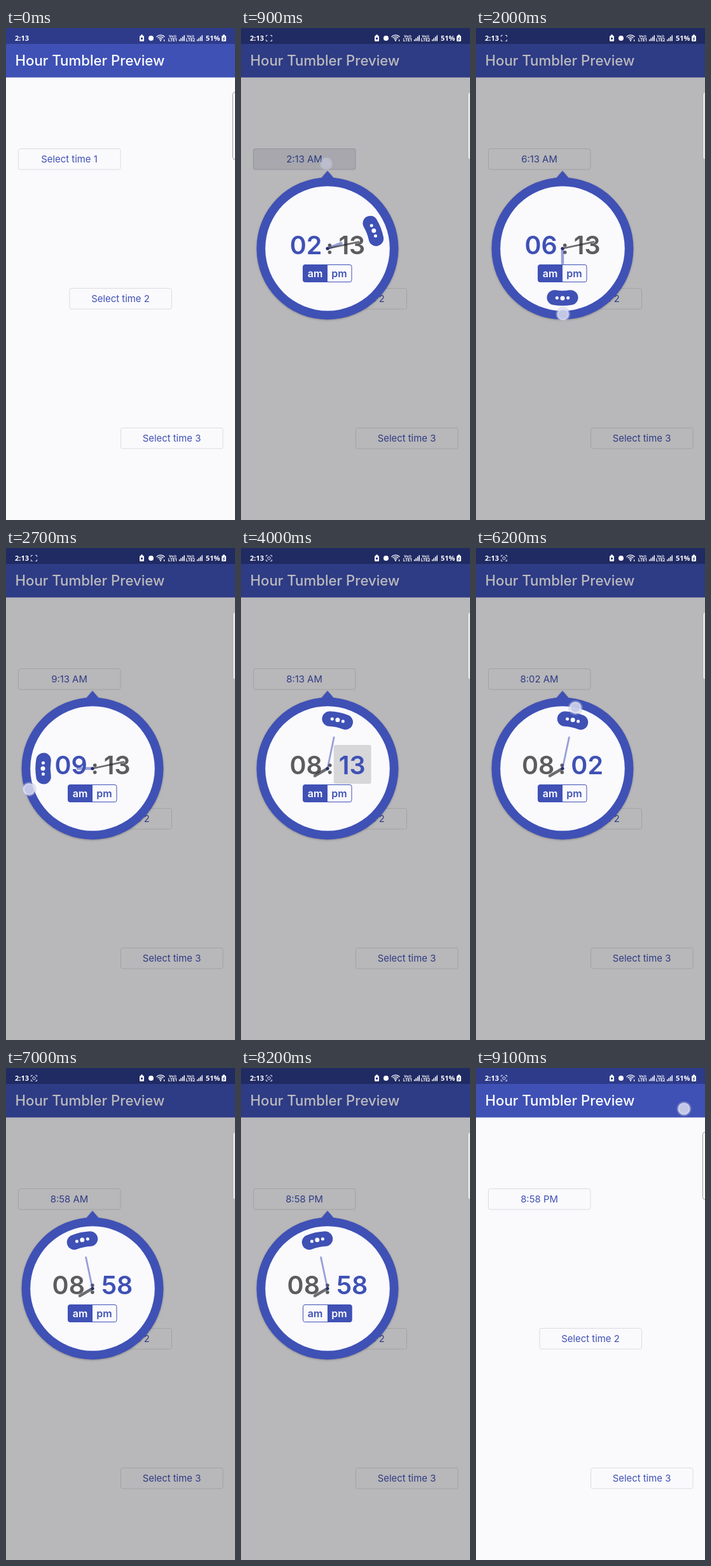
An HTML page with a canvas for the animation above (9200 ms loop, 360 by 772 pixels).

```html
<!DOCTYPE html>
<html lang="en">
<head>
<meta charset="utf-8">
<title>Time picker</title>
<style>
html, body { margin: 0; width: 100%; height: 100%; overflow: hidden; background: #faf9fc; }
canvas { display: block; width: 360px; height: 772px; }
</style>
</head>
<body>
<canvas></canvas>
<script>
const LOOP = 9200, W = 360, H = 772, CX = 136, CY = 346;
const BLUE = '#3f51b5', PAPER = '#faf9fc', GREY = '#5c5c5e';
const UI = 'Inter, sans-serif', SYSTEM = '"Noto Sans", sans-serif';
const canvas = document.querySelector('canvas');
const ctx = canvas.getContext('2d');
const ratio = window.devicePixelRatio || 1;
canvas.width = W * ratio;
canvas.height = H * ratio;

const clamp = v => Math.max(0, Math.min(1, v));
const smooth = u => u * u * (3 - 2 * u);
const ramp = (t, from, to) => smooth(clamp((t - from) / (to - from)));
const pulse = (t, from, to, fade = 80) => Math.min(ramp(t, from, from + 50), 1 - ramp(t, to - fade, to));

// Eased value from [time, value] keys
function track(keys, t) {
  let v = keys[0][1];
  for (let i = 1; i < keys.length; i++) {
    const [t0, v0] = keys[i - 1], [t1, v1] = keys[i];
    if (t >= t0) v = v0 + (v1 - v0) * ramp(t, t0, t1);
  }
  return v;
}

// Clock angles in degrees, clockwise from the top
const KNOB = [[1650, 69], [2350, 300], [2700, 270], [3050, 150], [3400, 240], [3750, 240],
  [4160, 438], [4600, 438], [6200, 732], [6450, 732], [6800, 708]];
const FINGER_LAG = [[1600, 0], [2700, -18], [3400, 0]];
const FINGER_RADIUS = [[1500, 78], [2100, 105], [4500, 105], [6200, 97.5]];

function polar(deg, r) {
  const a = deg * Math.PI / 180;
  return [CX + r * Math.sin(a), CY - r * Math.cos(a)];
}

function text(s, x, y, size, color, weight = 400, align = 'left', family = UI) {
  ctx.font = `${weight} ${size}px ${family}`;
  ctx.textAlign = align;
  ctx.fillStyle = color;
  ctx.fillText(s, x, y);
}

function rect(x, y, w, h, color) {
  ctx.fillStyle = color;
  ctx.fillRect(x, y, w, h);
}

function box(x, y, w, h, r, fill, stroke) {
  ctx.beginPath();
  ctx.roundRect(x, y, w, h, r);
  if (fill) { ctx.fillStyle = fill; ctx.fill(); }
  if (stroke) { ctx.strokeStyle = stroke; ctx.lineWidth = 1; ctx.stroke(); }
}

function disc(x, y, r, color) {
  ctx.beginPath();
  ctx.arc(x, y, r, 0, 7);
  ctx.fillStyle = color;
  ctx.fill();
}

function line(points, color, width) {
  ctx.beginPath();
  points.forEach(p => ctx.lineTo(...p));
  ctx.strokeStyle = color;
  ctx.lineWidth = width;
  ctx.stroke();
}

function button(x, y, label) {
  box(x + .5, y + .5, 160.5, 32.5, 3, PAPER, '#dcdde0');
  text(label, x + 80.5, y + 21.8, 14.9, BLUE, 400, 'center');
}

function signal(x, n) {
  text('Vo))', x, 15, 6, '#fff', 700, 'center', SYSTEM);
  text('LTE' + n, x, 21, 6.5, '#fff', 700, 'center', SYSTEM);
  for (let i = 0; i < 4; i++) rect(x + 10 + i * 2.5, 18 - i * 2.2, 1.5, 2.5 + i * 2.2, '#fff');
}

function battery(x) {
  box(x, 12, 7, 9, 1.5, '#fff');
  rect(x + 2, 10.5, 3, 2, '#fff');
}

function statusBar(t, dim) {
  const mix = (a, b) => Math.round(a + (b - a) * dim);
  rect(0, 0, W, 25, `rgb(${mix(46, 32)},${mix(59, 42)},${mix(139, 99)})`);
  text('2:13', 14, 20, 11, '#fff', 600, 'left', SYSTEM);
  if (t >= 500) {
    for (const sx of [-1, 1]) for (const sy of [-1, 1]) {
      line([[44 + sx * 4.5, 16 + sy * 2], [44 + sx * 4.5, 16 + sy * 4.5], [44 + sx * 2, 16 + sy * 4.5]], '#d5daf4', 1);
    }
    if (t >= 3600) box(42, 14, 4, 4, 1, null, '#d5daf4');
  }
  battery(210);
  rect(212, 15, 3, 3, '#303d8c');
  disc(228, 16, 4, '#fff');
  for (let i = 1; i < 4; i++) {
    ctx.beginPath();
    ctx.arc(243, 19.5, i * 2.8, -Math.PI * .78, -Math.PI * .22);
    ctx.strokeStyle = '#fff';
    ctx.lineWidth = 1.3;
    ctx.stroke();
  }
  disc(243, 19.5, 1.2, '#fff');
  rect(248, 18, 1.2, 3, '#fff');
  signal(262, 1);
  signal(290, 2);
  text('51%', 314, 20, 11, '#fff', 600, 'left', SYSTEM);
  battery(339);
  line([[344, 14], [341, 17], [344, 17], [341, 20]], '#303d8c', 1);
}

function knob(deg) {
  const a = (deg - 90) * Math.PI / 180;
  ctx.beginPath();
  ctx.arc(CX, CY, 78, a - .165, a + .165);
  ctx.strokeStyle = BLUE;
  ctx.lineWidth = 23.5;
  ctx.lineCap = 'round';
  ctx.stroke();
  for (const k of [-1, 0, 1]) disc(...polar(deg + k * 6.4, 78), k ? 2.5 : 3.5, '#fff');
}

function hand(deg, length, width, active) {
  line([[CX, CY], polar(deg, length)], active ? 'rgba(63,81,181,.53)' : 'rgba(35,35,40,.66)', width);
}

function digits(hour, minute, minuteMode, tap) {
  const pad = n => String(n).padStart(2, '0'), gap = 7, colon = 12;
  ctx.font = `600 39.5px ${UI}`;
  const hh = pad(hour), mm = pad(minute);
  const wh = ctx.measureText(hh).width + gap * 2;
  const wm = ctx.measureText(mm).width + gap * 2;
  const left = CX - (wh + colon + wm) / 2, right = left + wh + colon;
  if (tap > 0) box(right - 1, 309, wm + 3, 61, 3, `rgba(0,0,0,${.14 * tap})`);
  text(hh, left + gap, 355, 39.5, minuteMode ? GREY : BLUE, 600);
  text(mm, right + gap, 355, 39.5, minuteMode ? BLUE : GREY, 600);
  for (const y of [341, 352]) disc(left + wh + 5, y, 2.8, GREY);
}

function amPm(pm) {
  box(97.5, 371.5, 76.5, 27, 3, PAPER, BLUE);
  box(pm ? 136 : 97.5, 371.5, 38.5, 27, pm ? [0, 3, 3, 0] : [3, 0, 0, 3], BLUE);
  text('am', 116.5, 390.5, 16, pm ? BLUE : '#fff', 600, 'center');
  text('pm', 154.5, 390.5, 16, pm ? '#fff' : BLUE, 600, 'center');
}

function picker(t, state) {
  const { angle, hour, minute, minuteMode, pm } = state;
  ctx.save();
  ctx.shadowColor = 'rgba(0,0,0,.25)';
  ctx.shadowBlur = 3 * ratio;
  ctx.shadowOffsetY = ratio;
  ctx.beginPath();
  ctx.arc(CX, CY, 111.5, 0, 7);
  ctx.moveTo(CX, 224);
  ctx.lineTo(CX + 13, 239);
  ctx.lineTo(CX - 13, 239);
  ctx.fillStyle = BLUE;
  ctx.fill();
  ctx.restore();
  disc(CX, CY, 97.8, PAPER);
  knob(angle);
  digits(hour, minute, minuteMode, pulse(t, 3700, 4200, 120));
  amPm(pm);
  ctx.lineCap = 'round';
  hand(minuteMode ? hour * 30 : angle, 23, 4.5, !minuteMode);
  hand(minuteMode ? angle : minute * 6, 50, 2.8, minuteMode);
  ctx.lineCap = 'butt';
  disc(CX, CY, 2.6, '#26306e');
}

function finger(x, y, alpha) {
  if (alpha <= 0) return;
  ctx.globalAlpha = alpha;
  disc(x, y, 11.5, 'rgba(185,188,215,.4)');
  disc(x, y, 9.5, 'rgba(228,230,247,.8)');
  disc(x, y, 7, 'rgba(190,195,226,.7)');
  ctx.globalAlpha = 1;
}

function stateAt(t) {
  const raw = track(KNOB, t);
  const minuteMode = t >= 3700;
  const hour = minuteMode ? 8 : (Math.round(raw / 30) + 11) % 12 + 1;
  const minute = t < 4500 ? 13 : Math.round(raw / 6) % 60;
  const dragging = t > 1700 && !minuteMode;
  return { raw, minuteMode, hour, minute, angle: dragging ? Math.round(raw / 30) * 30 : raw, pm: t >= 7500 };
}

function draw(t) {
  const s = stateAt(t);
  const show = Math.min(ramp(t, 650, 870), 1 - ramp(t, 8210, 8500));
  ctx.setTransform(ratio, 0, 0, ratio, 0, 0);
  rect(0, 0, W, H, PAPER);
  rect(0, 25, W, 52.6, BLUE);
  text('Hour Tumbler Preview', 14.5, 58.5, 22.2, '#fff', 500);

  const clock = `${s.hour}:${String(s.minute).padStart(2, '0')} ${s.pm ? 'PM' : 'AM'}`;
  button(19, 189, t < 700 ? 'Select time 1' : clock);
  button(99.5, 408, 'Select time 2');
  button(180, 627, 'Select time 3');
  const press = pulse(t, 600, 1200, 250);
  if (press > 0) box(19, 189, 161.5, 33.5, 3, `rgba(40,50,110,${.11 * press})`);

  rect(0, 0, W, H, `rgba(0,0,0,${.265 * show})`);
  statusBar(t, show);
  box(356.5, 100.5, 10, 106, 4, 'rgba(255,255,255,.65)', show > .5 ? '#a9a8ab' : '#98989c');

  if (show > 0) {
    ctx.globalAlpha = show;
    picker(t, s);
    ctx.globalAlpha = 1;
  }

  finger(134, 213, pulse(t, 620, 1010, 260));
  const drag = Math.max(pulse(t, 1450, 3520), pulse(t, 4450, 6980));
  finger(...polar(s.raw + track(FINGER_LAG, t), track(FINGER_RADIUS, t)), drag);
  finger(174, 340, pulse(t, 3650, 3950));
  finger(155, 385, pulse(t, 7360, 7790));
  finger(327, 64, pulse(t, 8950, 9240));
}

function frame() {
  draw(performance.now() % LOOP);
  requestAnimationFrame(frame);
}
frame();
</script>
</body>
</html>
```
